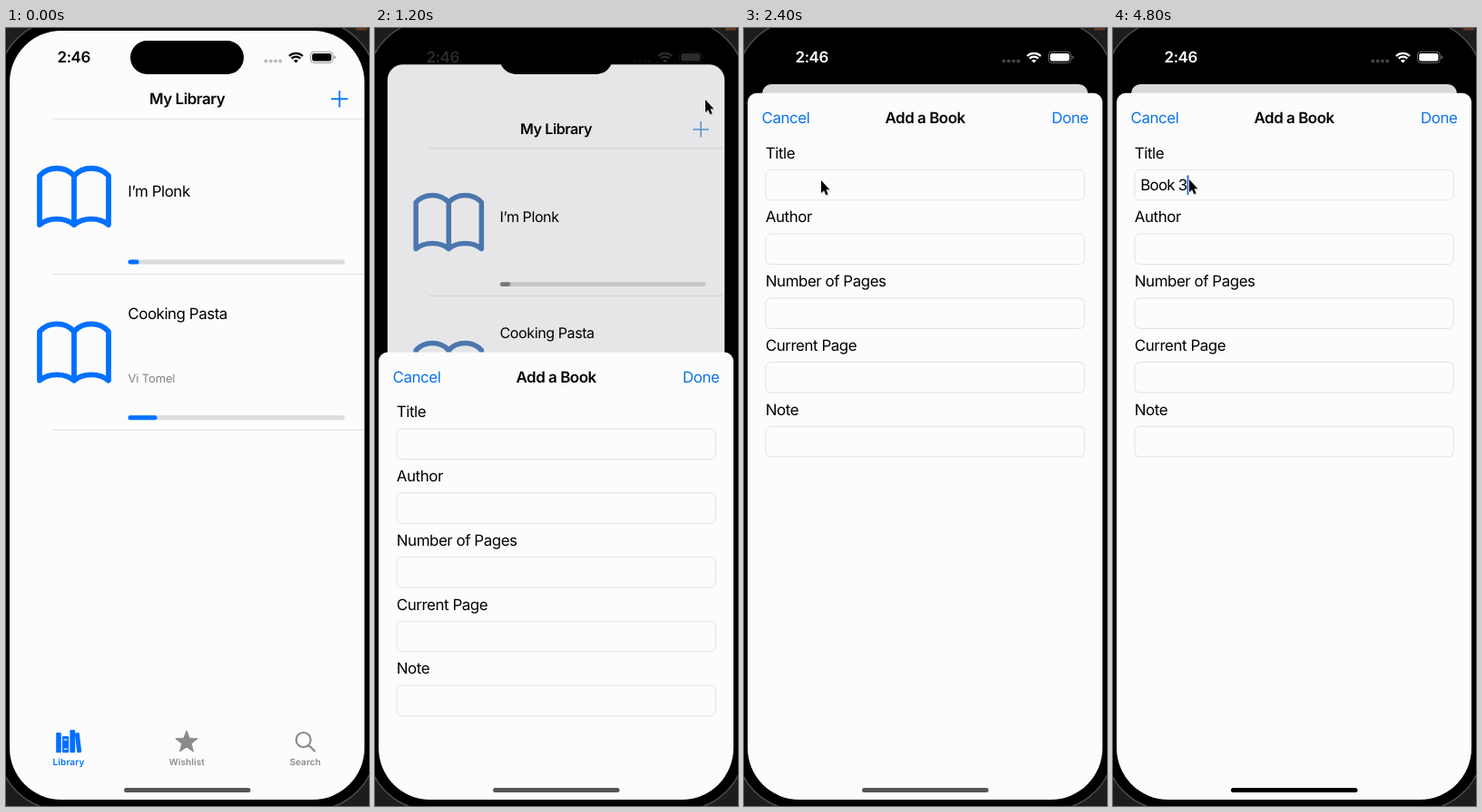
An HTML page for the animation above (5 s loop, 400 by 858 pixels).

```html
<!DOCTYPE html>
<html lang="en">
<head>
<meta charset="utf-8">
<title>My Library</title>
<style>
  html, body { margin: 0; width: 100%; height: 100%; overflow: hidden; background: #1d1d1e; }
  svg { display: block; width: 400px; height: 858px; }
  text {
    font-family: Inter, "Liberation Sans", sans-serif;
    font-size: 16.9px; letter-spacing: -.44px;
    text-rendering: geometricPrecision;
  }
  .bold { font-weight: 600; }
  .mid { text-anchor: middle; }
  .end { text-anchor: end; }
  .author { font-size: 12.9px; letter-spacing: -.08px; fill: #858587; }
  .tab { font-size: 10px; font-weight: 600; letter-spacing: .1px; }
  .typed { letter-spacing: -.75px; }
  .link { fill: #0b73ec; }
  .rule { stroke: var(--rule); stroke-width: 1; }
  .book { fill: none; stroke: var(--icon); stroke-width: 5.8; stroke-linejoin: round; stroke-linecap: round; }
  .field { fill: #fcfcfd; stroke: #e2e2e4; stroke-width: 1; }
  #library { --icon: #0070ff; --plus: #0a7aff; --fill: #0070ff; --track: #dcdcdd; --rule: #dfdfe1; --page: #fcfcfd; }
  #library.dim { --icon: #4b76ae; --plus: #6d9bd3; --fill: #78787b; --track: #c5c5c7; --rule: #cfcfd2; --page: #e6e6e8; }
  #library.back { --page: #d9d9d9; }
  #library.pressed { --plus: #b4d6fd; }
</style>
</head>
<body>
<svg viewBox="0 0 400 858" xmlns="http://www.w3.org/2000/svg">
  <defs>
    <clipPath id="screen"><rect x="4" y="3" width="391" height="848" rx="57"/></clipPath>
    <path id="openBook" class="book" d="M75 217V163C65 152 47 152 37 163V217C47 208.5 65 208.5 75 217C85 208.5 103 208.5 113 217V163C103 152 85 152 75 163"/>
  </defs>

  <rect width="400" height="858" fill="#1d1d1e"/>
  <rect x="386" width="12" height="2.5" fill="#6b3522"/>
  <rect x="-8" y="-8" width="415" height="870" rx="68" fill="#000" stroke="#505052" stroke-width="1.3"/>

  <g clip-path="url(#screen)">
    <g id="library">
      <rect id="page" x="4" y="3" width="391" height="848" fill="var(--page)"/>
      <text class="bold mid" x="199.6" y="84.2">My Library</text>
      <path d="M359 78.3h17M367.5 69.8v17" stroke="var(--plus)" stroke-width="1.9" stroke-linecap="round"/>
      <path class="rule" d="M52 100.3H393M52 271.5H393M52 443.2H393"/>

      <use href="#openBook"/>
      <text x="134.3" y="186.2">I’m Plonk</text>
      <use href="#openBook" y="171.7"/>
      <text x="134.3" y="320.5">Cooking Pasta</text>
      <text class="author" x="134.4" y="391.2">Vi Tomel</text>

      <g fill="var(--track)">
        <rect x="134.5" y="255.6" width="238.8" height="5" rx="2.5"/>
        <rect x="134.5" y="427.3" width="238.8" height="5" rx="2.5"/>
      </g>
      <g fill="var(--fill)">
        <rect x="134.5" y="255.6" width="12" height="5" rx="2.5"/>
        <rect x="134.5" y="427.3" width="32" height="5" rx="2.5"/>
      </g>

      <g fill="var(--icon)">
        <rect x="55.2" y="777" width="5.6" height="22.3" rx="1.3"/>
        <rect x="62" y="781" width="7.2" height="18.3" rx="1.3"/>
        <rect x="70.4" y="774" width="5.8" height="25.3" rx="1.3"/>
        <rect x="77" y="777.2" width="5" height="22" rx="1.2" transform="rotate(-7 79.5 788)"/>
        <text class="tab mid" x="69" y="813.4">Library</text>
      </g>
      <path d="M63.6 784.8h4M63.6 795.2h4" stroke="#fcfcfd" stroke-width="1.3"/>
      <g fill="#8b8b8d">
        <path id="star" stroke="#8b8b8d" stroke-linejoin="round"/>
        <text class="tab mid" x="199.2" y="813.4">Wishlist</text>
        <text class="tab mid" x="329.7" y="813.4">Search</text>
      </g>
      <path d="M335.7 785a8 8 0 1 1-16 0a8 8 0 0 1 16 0M333.5 791l6.6 6.3" fill="none" stroke="#8b8b8d" stroke-width="2.2" stroke-linecap="round"/>
    </g>

    <g id="sheet">
      <rect x="4" width="391" height="900" rx="10" fill="#fcfcfd"/>
      <text class="link" x="19.6" y="33.7">Cancel</text>
      <text class="bold mid" x="199.6" y="33.7">Add a Book</text>
      <text class="link end" x="379.4" y="33.7">Done</text>
      <g id="form"></g>
      <text id="typed" class="typed" x="30.3" y="107.6"></text>
      <rect id="caret" y="90.5" width="1.9" height="22" rx=".9" fill="#2a66d8"/>
    </g>
  </g>

  <g id="status">
    <text class="bold" x="56.6" y="38.2" fill="currentColor">2:46</text>
    <g fill="currentColor" opacity=".26">
      <circle cx="286.3" cy="36.5" r="2"/><circle cx="291.7" cy="36.5" r="2"/>
      <circle cx="297" cy="36.5" r="2"/><circle cx="302.3" cy="36.5" r="2"/>
    </g>
    <g fill="none" stroke="currentColor" stroke-width="2.3">
      <path d="M312 30.9a10.7 10.7 0 0 1 15 0M314.7 33.6a6.8 6.8 0 0 1 9.6 0"/>
      <path d="M319.5 38.6l-2.6-2.6a3.7 3.7 0 0 1 5.2 0z" fill="currentColor" stroke="none"/>
    </g>
    <rect x="335.5" y="26.2" width="24.8" height="12.2" rx="3.8" fill="none" stroke="currentColor" opacity=".4"/>
    <rect x="337.3" y="28" width="21.2" height="8.6" rx="2.3" fill="currentColor"/>
    <path d="M361.6 30.3q1.6 .6 1.6 2t-1.6 2z" fill="currentColor" opacity=".45"/>
  </g>
  <rect x="137" y="14" width="125" height="37" rx="18.5"/>
  <rect id="home" x="130" y="838" width="139.5" height="5" rx="2.5"/>

  <g id="cursor">
    <path d="M.8 1.2V15.2L3.9 12.4L6 17.4L8.4 16.4L6.3 11.5H10.2Z" fill="#000" opacity=".18"/>
    <path d="M0 0V14L3.1 11.2L5.2 16.2L7.6 15.2L5.5 10.3H9.4Z" stroke="#fff" stroke-width=".9" stroke-linejoin="round" paint-order="stroke"/>
  </g>
</svg>
<script>
const LOOP = 5000, STEP = 200;
const $ = id => document.getElementById(id);

$("form").innerHTML = ["Title", "Author", "Number of Pages", "Current Page", "Note"].map((label, i) => {
  const y = i * 70.75;
  return `<text x="23.8" y="${y + 71.9}">${label}</text>
    <rect class="field" x="24" y="${y + 84.5}" width="351.2" height="33.6" rx="5.5"/>`;
}).join("");

const points = Array.from({ length: 10 }, (_, i) => {
  const a = i * Math.PI / 5 - Math.PI / 2, r = i % 2 ? 5.4 : 12.8;
  return `${199 + r * Math.cos(a)} ${787.6 + r * Math.sin(a)}`;
});
$("star").setAttribute("d", `M${points.join("L")}Z`);

// Each row: start time, then the value held from there on.
const tracks = {
  cursor: [[0, null], [200, [360, 330]], [400, [361, 153]], [600, [358, 108]], [800, [365, 85]],
    [1000, [364, 79]], [2000, [160, 154]], [2200, [100, 152]], [2400, [85, 168]], [2800, [84, 167]]],
  // scale, top offset, corner radius, class
  library: [[0, [1, 0, 0, ""]], [1000, [1, 0, 0, "pressed"]], [1200, [.95, 37.4, 18, "dim"]],
    [1400, [.92, 57.7, 11, "dim back"]], [1600, [.918, 59.2, 11, "dim back"]]],
  sheet: [[0, 900], [1200, 357.5], [1400, 87.7], [1600, 71.8]],
  status: [[0, "#000"], [1200, "#2b2b2c"], [1400, "#d2d2d2"], [1600, "#fff"]],
  home: [[0, "#555557"], [2600, "#000"]],
  typed: [[0, null], [2600, ""], [3200, "B"], [3800, "Bo"], [4000, "Boo"], [4200, "Book"],
    [4400, "Book\u00a0"], [4800, "Book\u00a03"]]
};
const at = (track, t) => track.findLast(row => row[0] <= t)[1];

function draw(t) {
  const tip = at(tracks.cursor, t);
  $("cursor").setAttribute("visibility", tip ? "visible" : "hidden");
  if (tip) $("cursor").setAttribute("transform", `translate(${tip})`);

  const [scale, top, radius, look] = at(tracks.library, t);
  $("library").setAttribute("transform", `translate(${199.6 * (1 - scale)} ${top}) scale(${scale})`);
  $("library").setAttribute("class", look);
  $("page").setAttribute("rx", radius);

  $("sheet").setAttribute("transform", `translate(0 ${at(tracks.sheet, t)})`);
  $("status").style.color = at(tracks.status, t);
  $("home").style.fill = at(tracks.home, t);

  const typed = at(tracks.typed, t);
  $("typed").textContent = typed || "";
  $("caret").setAttribute("visibility", typed === null ? "hidden" : "visible");
  $("caret").setAttribute("x", 30.3 + (typed ? $("typed").getComputedTextLength() : 0));
}

let shown = -1;
function tick() {
  const step = Math.floor(performance.now() % LOOP / STEP);
  if (step !== shown) draw((shown = step) * STEP);
  requestAnimationFrame(tick);
}
tick();
document.fonts.ready.then(() => { shown = -1; });
</script>
</body>
</html>
```
